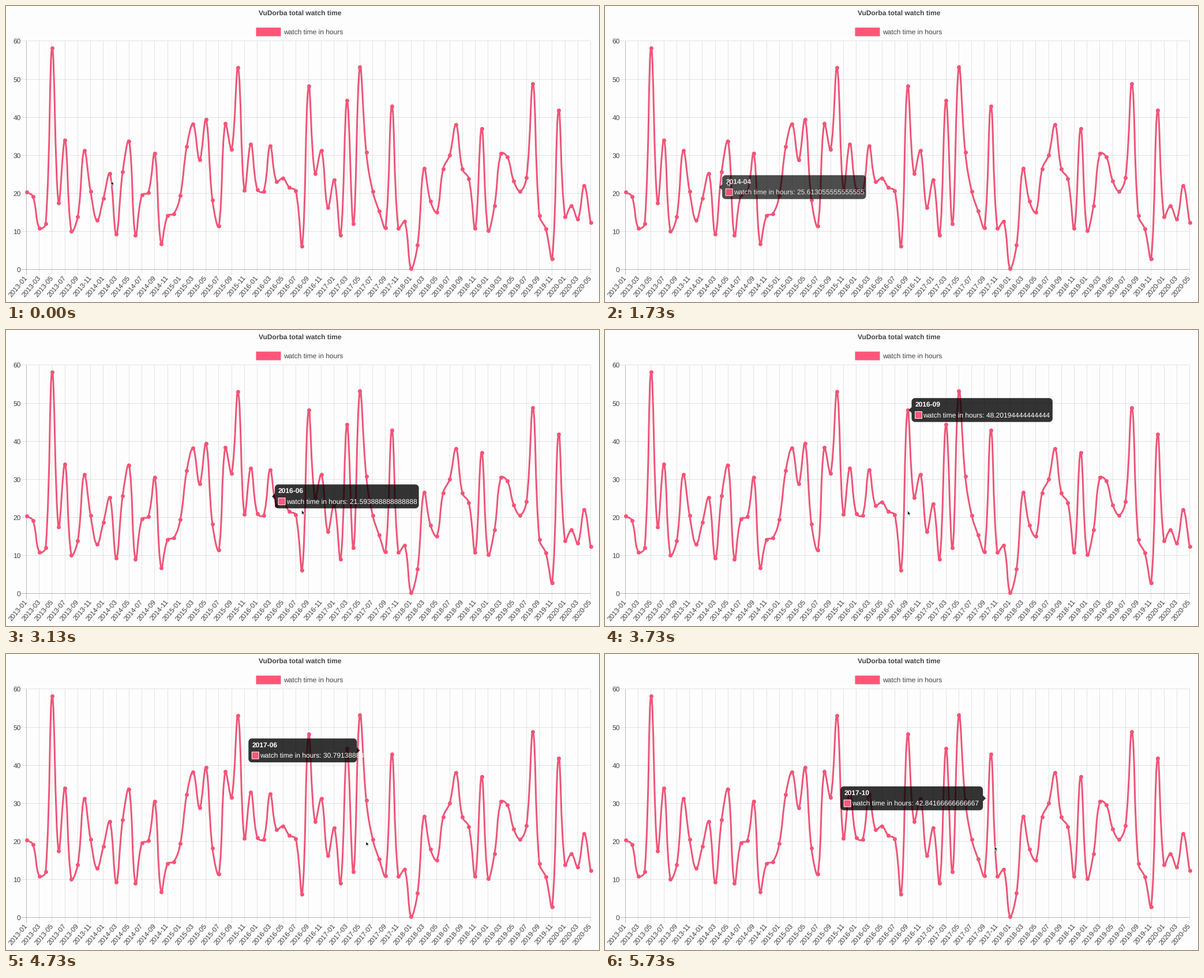
A matplotlib script that plays this animation: 1028 by 514 pixels, repeating every 5790 ms.

```python
import numpy as np
import matplotlib.pyplot as plt
from matplotlib.animation import FuncAnimation
from matplotlib.patches import PathPatch, Polygon, Rectangle
from matplotlib.path import Path

W, H, DPI = 1028, 514, 100
LOOP, INTERVAL, RATE = 5790, 30, 15
INK, PINK, LINE, DOT = "#434343", "#ff5578", "#ee5578", "#f85377"
PX = 72 / DPI

plt.rcParams["font.family"] = "Liberation Sans"
plt.rcParams["text.hinting"] = "none"

# Monthly hours, one row per year.
hours = np.array([
    20.4, 19.2, 10.9, 12.0, 58.2, 17.5, 34.0, 10.1, 13.9, 31.2, 20.5, 12.9,
    18.7, 25.2, 9.3, 25.61306, 33.7, 9.0, 19.6, 20.2, 30.5, 6.8, 14.14083, 14.7,
    19.5, 32.3, 38.2, 28.8, 39.4, 18.3, 11.5, 38.3, 31.6, 53.0, 20.8, 33.0,
    21.0, 20.6, 32.5, 23.1, 24.0, 21.59389, 20.7, 6.2, 48.2, 25.2, 31.3, 16.3,
    23.5, 9.08, 44.37, 12.03, 53.19, 30.79139, 20.6, 15.4, 11.0, 42.84167, 10.8, 12.6,
    0.2, 6.4, 26.6, 18.0, 15.1, 26.5, 30.0, 38.0, 26.4, 23.9, 10.8, 37.0,
    10.3, 16.7, 30.5, 29.6, 23.3, 20.6, 24.2, 48.8, 14.2, 10.7, 2.9, 41.9,
    13.9, 16.7, 13.3, 22.0, 12.3])
N = len(hours)
X0, STEP = 35.5, 978 / 88
TOP, BOTTOM, UNIT = 60.9, 457.8, 6.615
MIDDLE = X0 + STEP * (N - 1) / 2
px = X0 + STEP * np.arange(N)
py = BOTTOM - UNIT * hours

# Pointer stops: time in seconds, x.
STOPS = np.array([
    (1.45, 182.5), (1.73, 212), (2.0, 240), (2.27, 291.5), (3.13, 512.5),
    (3.3, 524), (3.88, 525), (4.12, 575), (4.27, 588), (4.45, 608),
    (4.63, 619.3), (4.73, 624), (5.45, 645), (5.58, 663.5), (5.73, 675.5)])
LAG, EASE_TIME, TICK = 0.065, 0.4, 60


def pointer(t):
    x = np.interp(t, *STOPS.T)
    return x, 304 + 30 * ((x - 182.5) / 493) ** 3


def month(i):
    return f"{2013 + i // 12}-{i % 12 + 1:02d}"


def value_text(i):
    """Whole seconds written as hours; rounded entries get a long tail."""
    sec = round(hours[i] * 3600)
    return str((sec + 7 * (sec % 360 == 0)) / 3600)


def tip_goal(i):
    w = 131 + 6.67 * len(value_text(i))
    left = px[i] + 7 if px[i] <= MIDDLE else px[i] - 7 - w
    return np.array([left, py[i], w, 1])


def hover_poses():
    """Month and tooltip pose per step; each new month restarts the ease."""
    poses, month_now, pose = [], None, None
    for n in range(LOOP * TICK // 1000 + 1):
        t = n / TICK
        if t > STOPS[0, 0] + LAG:
            i = round((pointer(t - LAG)[0] - X0) / STEP)
            if i != month_now:
                goal, began = tip_goal(i), t
                start = goal * [1, 1, 1, 0] if pose is None else pose
                month_now = i
            left = max(0, 1 - (t - began) / EASE_TIME)
            pose = goal + (start - goal) * left ** 4
        if n % (TICK // RATE) == 0:
            poses.append((month_now, pose))
    return poses


def spline(tension=0.4):
    pts = np.column_stack([px, py])
    prev = np.vstack([pts[:1], pts[:-1]])
    nxt = np.vstack([pts[1:], pts[-1:]])
    d0 = np.hypot(*(pts - prev).T)
    d1 = np.hypot(*(nxt - pts).T)
    share = (d0 / (d0 + d1))[:, None]
    before = pts - tension * share * (nxt - prev)
    after = pts + tension * (1 - share) * (nxt - prev)
    for ctrl in (before, after):
        ctrl[:, 0] = np.clip(ctrl[:, 0], px[0], px[-1])
        ctrl[:, 1] = np.clip(ctrl[:, 1], TOP, BOTTOM)
    verts = [pts[0]]
    for i in range(N - 1):
        verts += [after[i], before[i + 1], pts[i + 1]]
    return Path(verts, [Path.MOVETO] + [Path.CURVE4] * (3 * (N - 1)))


def bubble(x, cy, w, right, h=41.5, r=6):
    """Rounded box with a caret on its left or right side."""
    y0, y1 = cy - h / 2, cy + h / 2
    a = np.linspace(0, np.pi / 2, 8)

    def corner(cx, cyy, start):
        return [(cx + r * np.cos(start + t), cyy + r * np.sin(start + t)) for t in a]

    pts = corner(x + r, y0 + r, np.pi) + corner(x + w - r, y0 + r, 1.5 * np.pi)
    if right:
        pts += [(x + w, cy - 5), (x + w + 5, cy), (x + w, cy + 5)]
    pts += corner(x + w - r, y1 - r, 0) + corner(x + r, y1 - r, 0.5 * np.pi)
    if not right:
        pts += [(x, cy + 5), (x - 5, cy), (x, cy - 5)]
    return pts


fig = plt.figure(figsize=(W / DPI, H / DPI), dpi=DPI, facecolor="#fdfdfd")
ax = fig.add_axes([0, 0, 1, 1])
ax.set_xlim(0, W)
ax.set_ylim(H, 0)
ax.axis("off")


def label(x, y, s, **kw):
    style = dict(fontsize=12 * PX, color=INK, va="baseline")
    return ax.text(x, y, s, **{**style, **kw})


def rule(xs, ys, first):
    ax.plot(xs, ys, color="black", alpha=0.27 if first else 0.1, lw=PX,
            solid_capstyle="butt", snap=False, zorder=1)


label(510, 15.7, "VuDorba total watch time", weight="bold", ha="center")
ax.add_patch(Rectangle((433.5, 37.5), 43, 15, fc=PINK, lw=0, snap=False))
label(480.7, 48.7, "watch time in hours")

for v in range(0, 61, 10):
    y = np.floor(BOTTOM - UNIT * v) + 0.5
    rule([26, 1013.5], [y, y], v == 0)
    label(25.7, y + 4.2, str(v), ha="right")
for i in range(0, N, 2):
    x = np.floor(px[i]) + 0.5
    rule([x, x], [61, 467.5], i == 0)
    label(px[i], 470.3, month(i), ha="right", va="center",
          rotation=50, rotation_mode="anchor")

ax.add_patch(PathPatch(spline(), fc="none", ec=LINE, lw=3 * PX,
                       joinstyle="round", zorder=3))
ax.plot(px, py, "o", color=DOT, ms=7 * PX, mew=0, snap=False, zorder=4)

tip = Polygon([(0, 0), (1, 0), (0, 1)], fc="black", lw=0, zorder=6)
swatch = Rectangle((0, 0), 12, 12, fc=PINK, ec="white", lw=PX,
                   snap=False, zorder=7)
ax.add_patch(tip)
ax.add_patch(swatch)
head = label(0, 0, "", color="white", weight="bold", zorder=8)
body = label(0, 0, "", color="white", zorder=8)

ARROW = np.array([(0, 0), (0, 7.5), (1.8, 5.9), (3, 8.6),
                  (4.2, 8), (3, 5.5), (5.3, 5.4)])
arrow = Polygon(ARROW, fc="black", ec="white", lw=0.7 * PX, zorder=9)
ax.add_patch(arrow)

poses = hover_poses()


def update(frame):
    k = int((frame * INTERVAL + INTERVAL - 1) * RATE / 1000)
    arrow.set_xy(ARROW + pointer(k / RATE))

    i, pose = poses[k]
    for part in (tip, swatch, head, body):
        part.set_visible(pose is not None)
    if pose is not None:
        x, cy, w, fade = pose
        tip.set_xy(bubble(x, cy, w, px[i] > MIDDLE))
        tip.set_alpha(0.8 * fade)
        swatch.set_xy((x + 6, cy + 2.7))
        head.set_text(month(i))
        head.set_position((x + 6, cy - 5.6))
        body.set_text("watch time in hours: " + value_text(i))
        body.set_position((x + 20, cy + 12.6))
        for part in (swatch, head, body):
            part.set_alpha(fade)
    return tip, swatch, head, body, arrow


anim = FuncAnimation(fig, update, frames=LOOP // INTERVAL, interval=INTERVAL,
                     repeat=True, repeat_delay=0)
plt.show()
```
